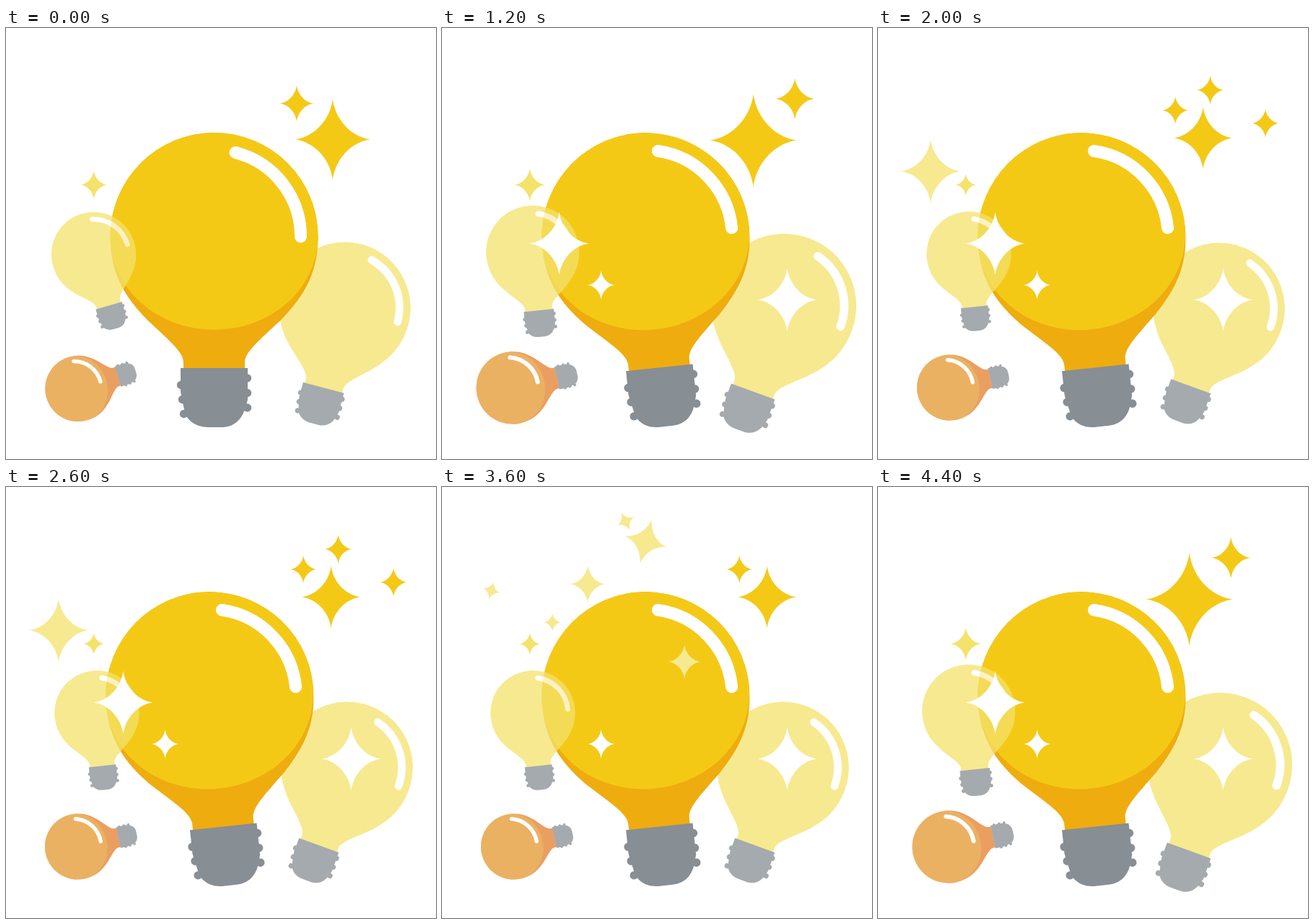
An HTML page that plays this animation: 596x597 px, repeating every 4.8 s.

```html
<!DOCTYPE html>
<html lang="en">
<head>
<meta charset="utf-8">
<title>Light bulbs</title>
<style>
html, body { margin: 0; width: 100%; height: 100%; overflow: hidden; background: #fff; }
svg { display: block; width: 100vw; height: 100vh; }
</style>
</head>
<body>
<svg id="stage" viewBox="0 0 596 597"></svg>
<script>
const TICK = 200, TICKS = 24;
const GOLD = '#f4c916', AMBER = '#efac0e', LEMON = '#f5e26b', PALE = '#f7e990';
const ORANGE = '#e5982e', RUST = '#e3802d', GREY = '#878e94', WHITE = '#fff';

// Bulb parts, drawn around the centre of the glass
const NECK = 'M-144 0A144 144 0 0 1 144 0C144 56 119 88 92 116C62 144 42.5 160 42.5 174V183H-42.5V174C-42.5 160-62 144-92 116C-119 88-144 56-144 0Z';
const GLASS = 'M-144 0A144 144 0 0 1 144 0A144 129 0 0 1-144 0Z';
const CAP = 'M-46.5 182H46.5V226L43 238C38 254 27 264 10 264H-8C-22 264-34 258-40 246L-44 228L-46.5 215Z';
const SHINE = 'M29.5-116.5A120 120 0 0 1 120 0';
const KNOBS = [0, 1, 2].map(i => knob(46, 196 + i * 20.5) + knob(i * 2 - 46, 205.5 + i * 20)).join('');
const STAR = 'M0-1C.07-.5 .48-.07 1 0C.48 .07 .07 .5 0 1C-.07 .5-.48 .07-1 0C-.48-.07-.07-.5 0-1Z';

function knob(x, y) {
  return `<circle cx="${x}" cy="${y}" r="5.7"/>`;
}

// True between the 1st and 2nd tick of the list, the 3rd and 4th, and so on
const on = (tick, edges) => edges.filter(e => e <= tick).length % 2 === 1;

// Every bulb turns and grows about its own middle, 60 units below the glass centre
const bulb = (x, y, scale, turn, glass, neck, opacity = 1, shine = '') =>
  `<g transform="translate(${x} ${y}) rotate(${turn}) scale(${scale}) translate(0 -60)" opacity="${opacity}">
    <path d="${NECK}" fill="${neck}"/><path d="${GLASS}" fill="${glass}"/>
    <g fill="${GREY}"><path d="${CAP}"/>${KNOBS}</g>
    <path d="${SHINE}" transform="${shine}" fill="none" stroke="#fff" stroke-width="17" stroke-linecap="round"/>
  </g>`;

const star = (fill, x, y, r, turn = 0) =>
  `<path d="${STAR}" fill="${fill}" transform="translate(${x} ${y}) rotate(${turn}) scale(${r} ${r * 1.07})"/>`;

// A big star with a little one diagonally above it, to the left (-1) or right (1)
function pair(fill, r, side) {
  const x = 443 - side * .19 * r, y = 146 + .16 * r;
  return star(fill, x, y, r) + star(fill, x + side * .96 * r, y - .96 * r, r * .445);
}

const BIG = 41, SMALL = 18.5, TINY = 12;
const TOP = [1, 4, 14, 15, 17, 19], DRIFT = [3, 4, 17, 19], FLANK = [8, 11, 13, 14];
// Ticks at which each spark appears and vanishes, then the star itself
const SPARKS = [
  [TOP, PALE, 282.5, 75.5, 30, 15],
  [TOP, PALE, 254.5, 47.5, 13, -26],
  [DRIFT, PALE, 202, 134.5, 24],
  [DRIFT, PALE, 153, 187.5, TINY],
  [DRIFT, PALE, 68.5, 143.5, TINY, 15],
  [DRIFT, PALE, 336, 242, 22],
  [[1, 3], PALE, 120, 155, 23],
  [FLANK, PALE, 73, 198.5, BIG],
  [FLANK, GOLD, 537, 132, SMALL],
  [[8, 9, 10, 11, 13, 14], GOLD, 460.5, 86, SMALL],
  [[1, 3, 6, 17, 19], WHITE, 162.5, 298.5, BIG],
  [[1, 3, 6, 11, 13, 19, 22], WHITE, 478.5, 376.5, BIG],
  [[5, 6], WHITE, 211, 409, BIG],
  [[6], WHITE, 220.5, 356, SMALL]
];

function scene(tick) {
  const tilt = +on(tick, [4, 8, 10, 19, 22]);
  const grown = on(tick, [6, 8, 22]);
  const grow = grown ? 1.1 : 1;
  const mainLit = on(tick, [14, 18]), allLit = on(tick, [15, 18]);
  const side = allLit ? [GOLD, ORANGE] : [LEMON, LEMON];
  const low = allLit ? [GOLD, ORANGE] : [ORANGE, RUST];
  const pulse = grown || on(tick, [19, 21]) ? 60 : on(tick, [0, 3, 21, 22]) ? 52 : 40;

  return bulb(460, 424, .63 * grow, 15 + 5 * tilt, ...side, .75) +
    bulb(288.5, 349, 1, -6 * tilt, ...(mainLit ? [LEMON, GOLD] : [GOLD, AMBER])) +
    star(LEMON, 121.7, 217.3, pulse * .35) +
    bulb(128.4, 337, .406 * grow, -16.5 + 10.5 * tilt, ...side, .75) +
    bulb(118, 494, .316 * grow, -107 + 4.5 * tilt, ...low, .75, 'rotate(92) translate(-17 -4.5)') +
    (tick === 5 ? '' : pair(allLit ? LEMON : GOLD, pulse, grown || allLit ? 1 : -1)) +
    SPARKS.map(([edges, ...spark]) => on(tick, edges) ? star(...spark) : '').join('');
}

const stage = document.getElementById('stage');
let shown;
function draw() {
  const tick = Math.floor(performance.now() / TICK) % TICKS;
  if (tick !== shown) stage.innerHTML = scene(shown = tick);
  requestAnimationFrame(draw);
}
draw();
</script>
</body>
</html>
```
